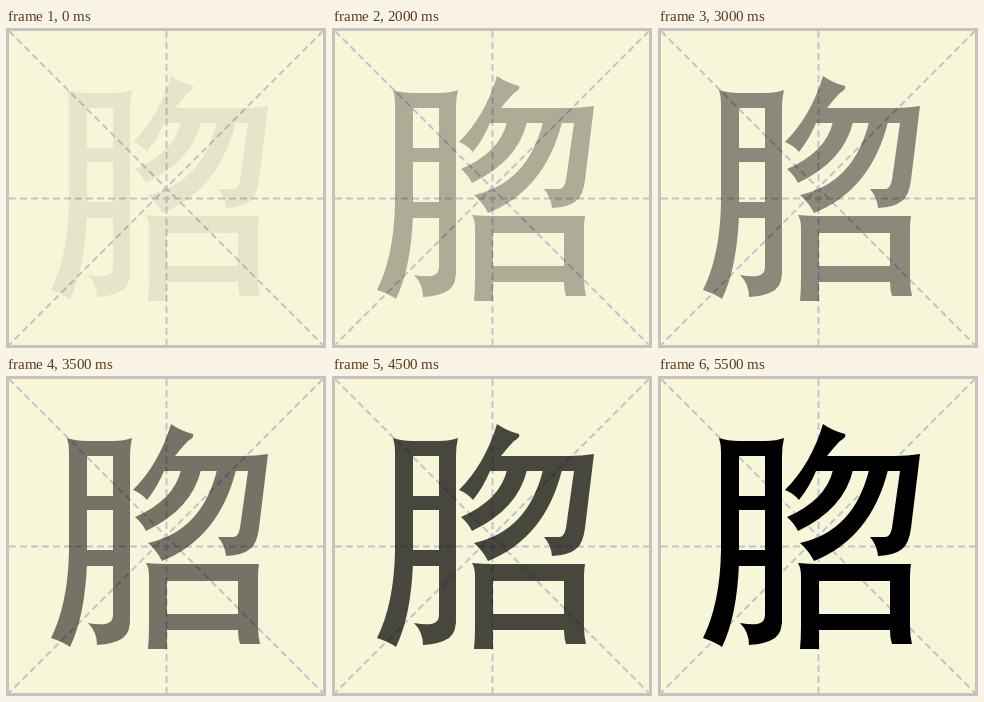
Recreate the animation shown at these times as an HTML page with a canvas. Size 320 px wide and 320 px high, loop 8 s.

```html
<!DOCTYPE html>
<html lang="zh">
<head>
<meta charset="utf-8">
<title>Character fade-in</title>
<style>
html, body { margin: 0; width: 100%; height: 100%; overflow: hidden; background: #f8f6d8; }
canvas { display: block; width: 320px; height: 320px; }
</style>
</head>
<body>
<canvas id="stage" width="320" height="320"></canvas>
<script>
const ctx = document.getElementById('stage').getContext('2d');
const LOOP = 8000;

// [start time in ms, ink opacity]
const steps = [
  [0, 0.07], [1000, 0.18], [2000, 0.3], [2500, 0.37], [3000, 0.445],
  [3500, 0.53], [4000, 0.61], [4500, 0.71], [5000, 0.82], [5500, 1]
];

// All strokes run clockwise, so overlaps merge into one shape.
const glyph = new Path2D([
  // left component
  'M61 62Q70 65 81 65V187Q79 240 64 271Q57 266 45 262Q62 228 63 175V76Q63 68 61 62Z',
  'M75 65H112V80H75Z',
  'M107 65Q118 65 126 62Q124 70 124 80V240Q125 256 117 262Q108 268 91 269Q91 256 82 247Q99 250 104 246Q107 244 107 238Z',
  'M80 120H108V134H80Z',
  'M80 174H108V190H80Z',
  // upper right component
  'M165 48Q175 55 187 58Q189 61 182 65Q177 70 169 80H236Q250 80 262 78L253 152Q251 168 244 173Q237 179 220 180Q219 169 212 161H226Q232 162 234 152L242 95H158Q152 110 141 124Q135 117 127 114Q153 88 165 48Z',
  'M175 94H195Q186 133 140 155Q136 147 129 141Q168 124 175 94Z',
  'M211 94H230Q213 162 156 185Q151 175 142 167Q196 155 211 94Z',
  // lower right box
  'M140 187Q150 188 161 188V273H142Q143 262 143 250V200Q143 192 140 187Z',
  'M155 188H240V205H155Z',
  'M232 188H253Q252 194 252 200V250Q252 260 254 268H234Q232 262 232 254Z',
  'M155 238H240V254H155Z'
].join(''));

function dashed(x1, y1, x2, y2) {
  ctx.beginPath();
  ctx.moveTo(x1, y1);
  ctx.lineTo(x2, y2);
  ctx.stroke();
}

function frame(inset, width, color) {
  ctx.strokeStyle = color;
  ctx.lineWidth = width;
  ctx.strokeRect(inset, inset, 320 - 2 * inset, 320 - 2 * inset);
}

function drawGrid() {
  ctx.fillStyle = '#f8f6d8';
  ctx.fillRect(0, 0, 320, 320);
  ctx.strokeStyle = '#c5c3ce';
  ctx.lineWidth = 2;
  ctx.setLineDash([7, 4]);
  dashed(3, 3, 317, 317);
  dashed(317, 3, 3, 317);
  dashed(3, 170.5, 317, 170.5);
  dashed(160.5, 3, 160.5, 317);
  ctx.setLineDash([]);
  frame(1, 2, '#c3c1c5');
  frame(2.5, 1, '#c9c6ab');
}

function draw(now) {
  const time = now % LOOP;
  const [, alpha] = steps.findLast(([start]) => start <= time);
  drawGrid();
  ctx.globalAlpha = alpha;
  ctx.fillStyle = '#000';
  ctx.fill(glyph);
  ctx.globalAlpha = 1;
}

function tick() {
  draw(performance.now());
  requestAnimationFrame(tick);
}
tick();
</script>
</body>
</html>
```
